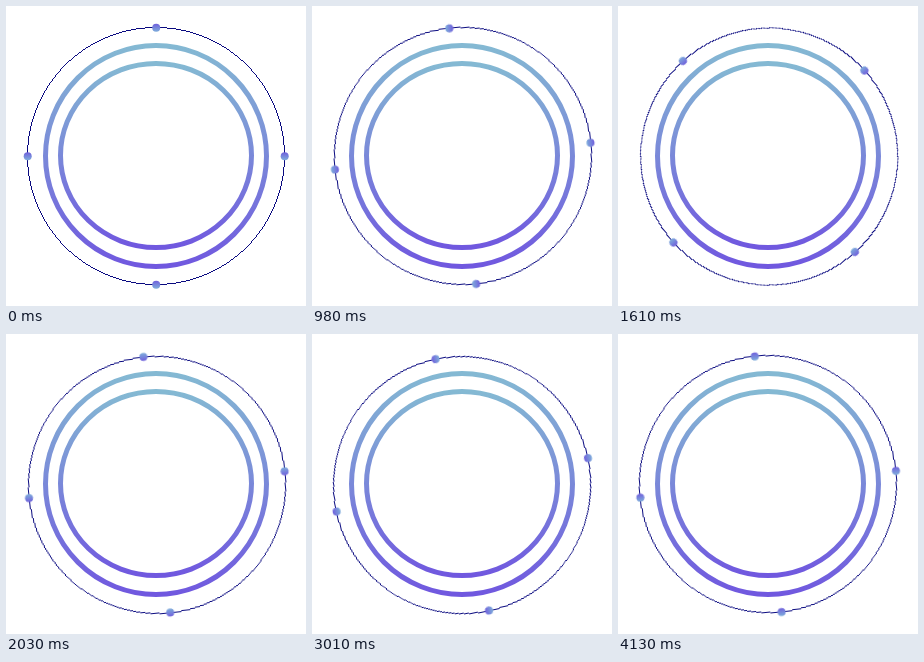
Animation, 300 px wide and 300 px high, one loop 4.2 s. Source, as an HTML page with a canvas:

```html
<!DOCTYPE html>
<html lang="en">
<head>
<meta charset="utf-8">
<title>Orbit rings</title>
<style>
  html, body { margin: 0; width: 100%; height: 100%; overflow: hidden; background: #fff; }
  canvas { display: block; width: 300px; height: 300px; }
</style>
</head>
<body>
<canvas id="stage" width="300" height="300"></canvas>
<script>
const SIZE = 300, LOOP = 4200, STEP = 70;
const PIVOT = 150.5, ORBIT = 128.5, DOT = 4;
const ctx = document.getElementById('stage').getContext('2d');

function fade(c, y0, y1, top, bottom) {
  const g = c.createLinearGradient(0, y0, 0, y1);
  g.addColorStop(0, top);
  g.addColorStop(1, bottom);
  return g;
}

function ring(cy, rx, ry) {
  ctx.strokeStyle = fade(ctx, cy - ry, cy + ry, '#84b9d3', '#7058df');
  ctx.lineWidth = 5;
  ctx.beginPath();
  ctx.ellipse(150, cy, rx, ry, 0, 0, Math.PI * 2);
  ctx.stroke();
}

// The orbit is a crisp one-pixel line that gets resampled when it turns.
function makeOrbit() {
  const layer = document.createElement('canvas');
  layer.width = layer.height = SIZE;
  const c = layer.getContext('2d');
  c.fillStyle = '#0a0a80';
  const reach = Math.ceil(ORBIT * Math.SQRT1_2);
  for (let i = -reach; i < reach; i++) {
    const d = i + 0.5;
    const h = Math.sqrt(ORBIT * ORBIT - d * d);
    const far = Math.floor(150 + h), near = 299 - far;
    for (const edge of [near, far]) {
      c.clearRect(150 + i, edge, 1, 1);
      c.fillRect(150 + i, edge, 1, 1);
      c.clearRect(edge, 150 + i, 1, 1);
      c.fillRect(edge, 150 + i, 1, 1);
    }
  }
  for (let k = 0; k < 4; k++) {
    const a = k * Math.PI / 2;
    const x = 150.2 + ORBIT * Math.sin(a), y = 150.3 - ORBIT * Math.cos(a);
    c.fillStyle = fade(c, y - DOT, y + DOT, '#7060dc', '#7eaedb');
    c.beginPath();
    c.arc(x, y, DOT, 0, Math.PI * 2);
    c.fill();
  }
  return layer;
}

const orbit = makeOrbit();
const start = performance.now();

function draw(now) {
  const t = Math.max(0, now - start) % LOOP;
  const turn = Math.floor(t / STEP) * STEP / LOOP * Math.PI * 2;
  ctx.fillStyle = '#fff';
  ctx.fillRect(0, 0, SIZE, SIZE);
  ring(150, 110.5, 110.5);
  ring(149.5, 95.5, 92);
  ctx.save();
  if (turn) {
    ctx.translate(PIVOT, PIVOT);
    ctx.rotate(turn);
    ctx.translate(-PIVOT, -PIVOT);
  }
  ctx.drawImage(orbit, 0, 0);
  ctx.restore();
  requestAnimationFrame(draw);
}
draw(start);
</script>
</body>
</html>
```
